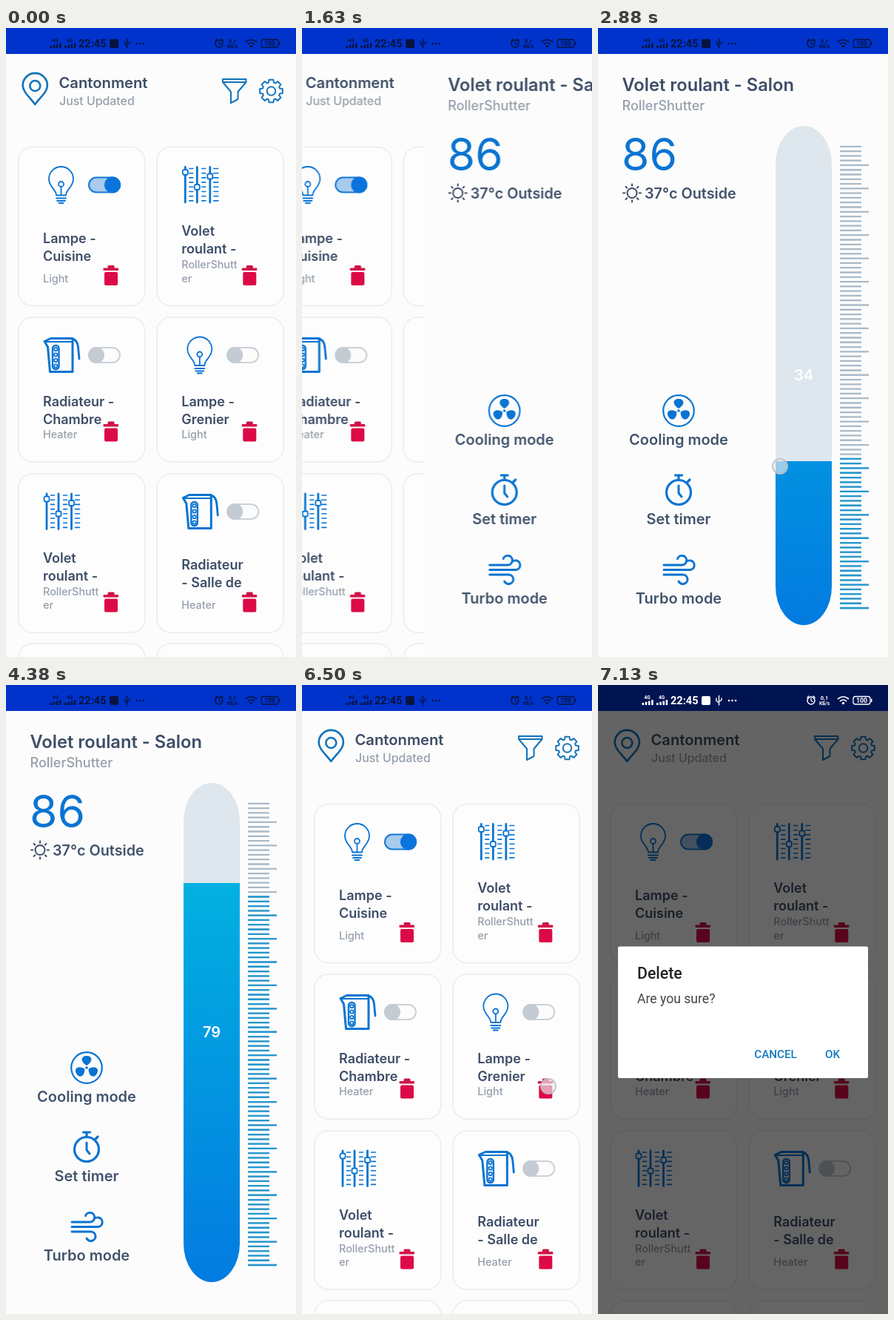
These frames come from a looping animation (392x848 px, 8000 ms). An HTML page:

```html
<!DOCTYPE html>
<html lang="en">
<head>
<meta charset="utf-8">
<title>Home control</title>
<style>
html, body { margin: 0; width: 100%; height: 100%; overflow: hidden; background: #fcfcfc; }
#stage { position: relative; width: 392px; height: 848px; overflow: hidden; font-family: Inter, "Open Sans", sans-serif; }
#stage > *, .page > * { position: absolute; }
.page, svg, #dim { left: 0; top: 0; width: 392px; height: 848px; }
.page { background: #fcfcfc; }
svg { display: block; }
text { white-space: pre; }
.roboto { font-family: Roboto, sans-serif; }

/* every motion advances in 125 ms steps */
#list, #detail, #touch, #dim, #dialog, #status, #live {
  animation: 8s step-end -8ms infinite;
}
#list { animation-name: under; }
#detail { animation-name: slide, level; animation-duration: 8s, 8s; transform: translateX(100%); --lvl: 240; --val: 86; }
#live { animation-name: live; clip-path: inset(calc(var(--lvl) * .93px + 33.5px) 0 0 0); }
#touch { animation-name: touch; }
#dim { animation-name: dim; background: #000; opacity: 0; }
#dialog { animation-name: dialog; opacity: 0; transform-origin: 196px 441px; }
#status { animation-name: status; color: #07143f; }

#bar { left: 0; top: 0; width: 392px; height: 34.5px; background: #0033cc; }
#tank { left: 240px; top: 132px; width: 76px; height: 673px; border-radius: 38px / 52px; overflow: hidden; background: #dde7ed; }
#fill { height: 100%; background: linear-gradient(#02b3e1 108px, #027be0 100%); clip-path: inset(calc(var(--lvl) * 1px - 132px) 0 0 0); }
#value { left: 240px; top: 456px; width: 76px; text-align: center; color: #fff; font-size: 20px; font-weight: 600; line-height: 24px; counter-reset: value var(--val); }
#value::after { content: counter(value); }
#touch { left: -11px; top: -11px; width: 18px; height: 18px; border: 2px solid rgba(190,182,186,.75); border-radius: 50%; background: rgba(235,238,240,.65); opacity: 0; }

@keyframes slide {
  0% { transform: translateX(100%); }
  18.75% { transform: translateX(84%); }
  20.3125% { transform: translateX(42%); }
  21.875% { transform: translateX(16%); }
  23.4375% { transform: translateX(4%); }
  25% { transform: none; }
  56.25% { transform: translateX(26%); }
  57.8125% { transform: translateX(80%); }
  59.375% { transform: translateX(100%); }
}
@keyframes under {
  0% { transform: none; }
  18.75% { transform: translateX(-5%); }
  20.3125% { transform: translateX(-17%); }
  21.875% { transform: translateX(-25%); }
  23.4375% { transform: translateX(-29%); }
  25% { transform: translateX(-30%); }
  56.25% { transform: translateX(-22%); }
  57.8125% { transform: translateX(-6%); }
  59.375% { transform: none; }
}
@keyframes level {
  0% { --lvl: 240; --val: 86; }
  32.8125% { --lvl: 305; --val: 76; }
  34.375% { --lvl: 445; --val: 55; }
  35.9375% { --lvl: 584; --val: 34; }
  37.5% { --lvl: 640; --val: 25; }
  39.0625% { --lvl: 662; --val: 21; }
  40.625% { --lvl: 664; --val: 20; }
  42.1875% { --lvl: 590; --val: 33; }
  43.75% { --lvl: 400; --val: 60; }
  45.3125% { --lvl: 275; --val: 78; }
  48.4375% { --lvl: 267; --val: 79; }
}
@keyframes live { 0% { opacity: 0; } 32.8125% { opacity: 1; } }
@keyframes touch {
  0% { opacity: 0; }
  15.625% { opacity: 1; transform: translate(256px, 290px); }
  18.75% { opacity: 0; }
  31.25% { opacity: 1; transform: translate(246px, 247px); }
  32.8125% { opacity: 1; transform: translate(246px, 312px); }
  34.375% { opacity: 1; transform: translate(246px, 452px); }
  35.9375% { opacity: 1; transform: translate(246px, 591px); }
  37.5% { opacity: 1; transform: translate(246px, 647px); }
  39.0625% { opacity: 1; transform: translate(246px, 669px); }
  40.625% { opacity: 1; transform: translate(246px, 671px); }
  42.1875% { opacity: 1; transform: translate(246px, 597px); }
  43.75% { opacity: 1; transform: translate(246px, 407px); }
  45.3125% { opacity: 1; transform: translate(246px, 282px); }
  48.4375% { opacity: .6; transform: translate(246px, 274px); }
  50% { opacity: 0; }
  81.25% { opacity: 1; transform: translate(333px, 541px); }
  84.375% { opacity: 0; }
}
@keyframes dim {
  0% { opacity: 0; }
  84.375% { opacity: .15; }
  85.9375% { opacity: .4; }
  87.5% { opacity: .57; }
  89.0625% { opacity: .6; }
}
@keyframes dialog {
  0% { opacity: 0; }
  85.9375% { opacity: .6; transform: scale(.97); }
  87.5% { opacity: .96; transform: none; }
  89.0625% { opacity: 1; transform: none; }
}
@keyframes status {
  0% { color: #07143f; }
  84.375% { color: #5a678f; }
  85.9375% { color: #c5cbdd; }
  87.5% { color: #fff; }
}
</style>
</head>
<body>
<div id="stage">
  <div id="list" class="page"></div>
  <div id="detail" class="page">
    <svg id="info"></svg>
    <svg id="scale"></svg>
    <svg id="live"></svg>
    <div id="tank"><div id="fill"></div></div>
    <div id="value"></div>
  </div>
  <div id="bar"></div>
  <div id="touch"></div>
  <div id="dim"></div>
  <svg id="dialog" class="roboto"></svg>
  <svg id="status" class="roboto"></svg>
</div>
<script>
const BLUE = '#0a74d2', INK = '#3d4d67', GREY = '#959fac';
const $ = id => document.getElementById(id);
const text = (x, y, s, size, weight, fill, anchor = 'start') =>
  `<text x="${x}" y="${y}" font-size="${size}" font-weight="${weight}" fill="${fill}" text-anchor="${anchor}">${s}</text>`;
const at = (x, y, body) => `<g transform="translate(${x} ${y})">${body}</g>`;
const line = (d, width = 2, color = BLUE, fill = 'none') =>
  `<path d="${d}" fill="${fill}" stroke="${color}" stroke-width="${width}" stroke-linecap="round" stroke-linejoin="round"/>`;
const dot = (x, y, r, fill, stroke = 'none', width = 0) =>
  `<circle cx="${x}" cy="${y}" r="${r}" fill="${fill}" stroke="${stroke}" stroke-width="${width}"/>`;
const box = (x, y, w, h, r, fill, stroke = 'none', width = 0) =>
  `<rect x="${x}" y="${y}" width="${w}" height="${h}" rx="${r}" fill="${fill}" stroke="${stroke}" stroke-width="${width}"/>`;
const range = (n, f) => Array.from({ length: n }, (_, i) => f(i)).join('');

const icons = {
  bulb:
    line('M17.5 39C17.5 31 7.5 28 7.5 17A16.5 16.5 0 0 1 40.5 17C40.5 28 30.5 31 30.5 39Z', 1.8) +
    line('M17.5 43H30.5M18.5 46.5H29.5M21 49.5H27M24 27V38', 1.8) + dot(24, 24, 3.5, 'none', BLUE, 1.8),
  sliders:
    line([10, 27, 43].map(x => range(8, i => `M${x} ${3 + i * 6.2}h${x > 40 ? 6 : 5}`)).join(''), 1.6) +
    line('M4.5 1V48.5M20.5 1V48.5M38 1V48.5', 2.8) +
    [[4.5, 8], [20.5, 28], [38, 13.5]].map(([x, y]) => box(x - 3.5, y - 3.5, 7, 7, 2, '#fcfcfc', BLUE, 1.8)).join(''),
  kettle:
    line('M9 47.5L6 14L1.5 6.5L10 2.5H39.5V47.5Z', 3) + line('M3 7H39', 2.2) +
    line('M32 2.5H38Q46 4 47 14L48.5 30', 2.8) + box(12.5, 12, 8.5, 32, 4, 'none', BLUE, 2.4) +
    range(4, i => dot(16.8, 17 + i * 7.5, 2.2, 'none', BLUE, 1.8))
};

const toggle = on => on
  ? box(1, 1, 42, 20, 10, '#a8caec', '#1479d6', 2) + dot(33, 11, 11, '#0a74dc')
  : box(1, 1, 42, 20, 10, '#fcfcfc', '#cbd1d8', 2) + dot(11, 11, 11, '#c4cbd3');
const trash = box(6, 0, 9, 5, 1.5, '#c91346') + box(0, 3.5, 20.5, 3.5, 1, '#d41348') + box(1.5, 9, 18, 18, 2, '#dc0a46');

// Title and caption lines hang from the card's bottom edge.
function card(x, y, h, icon, title, titleY, caption, state) {
  const small = caption.map((s, i) => text(34, h - 31.5 - 18.5 * (caption.length - 1 - i), s, 14.4, 500, GREY)).join('');
  return at(x, y, box(.75, .5, 171, h, 19, '#fdfdfd', '#ececee', 1.5) +
    at(34.5, 26.5, icons[icon]) +
    (state == null ? '' : at(95, 40.5, toggle(state))) +
    title.map((s, i) => text(34, h - titleY + i * 24, s, 18, 600, INK)).join('') + small +
    at(115.5, h - 54, trash));
}

const gear = range(8, i => [[-.3, 12], [-.19, 15.6], [.19, 15.6], [.3, 12]].map(([a, r], j) => {
  const t = i * Math.PI / 4 + a;
  return `${i + j ? 'L' : 'M'}${(r * Math.cos(t)).toFixed(2)} ${(r * Math.sin(t)).toFixed(2)}`;
}).join('')) + 'Z';

const shutter = ['RollerShutt', 'er'], roller = ['Volet', 'roulant -'];
$('list').innerHTML = '<svg>' +
  line('M39.3 103C31 92 22.7 86 22.7 77.5A16.6 16.6 0 0 1 55.9 77.5C55.9 86 47.5 92 39.3 103Z', 2.6, '#1273ba') +
  dot(39.3, 78, 7, 'none', '#1273ba', 2.6) +
  text(71.5, 81, 'Cantonment', 20.2, 600, INK) + text(72, 104, 'Just Updated', 15.9, 500, GREY) +
  line('M293 69H324.5V73L313.5 86V96L304 101V86L293 73ZM293 73H324.5', 2, '#1273ba') +
  at(358.5, 85, line(gear, 2, '#1a76bc') + dot(0, 0, 5.8, 'none', '#1a76bc', 2)) +
  card(16, 160, 214, 'bulb', ['Lampe -', 'Cuisine'], 84, ['Light'], true) +
  card(203.3, 160, 214, 'sliders', roller, 94, shutter) +
  card(16, 389.5, 195, 'kettle', ['Radiateur -', 'Chambre'], 75, ['Heater'], false) +
  card(203.3, 389.5, 195, 'bulb', ['Lampe -', 'Grenier'], 75, ['Light'], false) +
  card(16, 600.5, 214, 'sliders', roller, 94, shutter) +
  card(203.3, 600.5, 214, 'kettle', ['Radiateur', '- Salle de'], 84.5, ['Heater'], false) +
  [16, 203.3].map(x => box(x + .75, 830, 171, 195, 19, '#fdfdfd', '#ececee', 1.5)).join('') + '</svg>';

const rays = range(8, i => `<path d="M0-9.8V-12" transform="rotate(${i * 45})" stroke="${INK}" stroke-width="2" stroke-linecap="round"/>`);
const blades = range(3, i => `<path d="M0-3C-9-8-8-16 0-16S9-8 0-3Z" transform="rotate(${i * 120})" fill="${BLUE}"/>`);
const label = (y, s) => text(109, y, s, 20, 600, '#41536b', 'middle');
$('info').innerHTML =
  text(32.5, 84.5, 'Volet roulant - Salon', 23.7, 600, INK) +
  text(32.5, 110.5, 'RollerShutter', 18, 500, GREY) +
  text(32, 192, '86', 60.5, 400, BLUE) +
  at(46, 222.5, dot(0, 0, 6.5, 'none', INK, 2) + rays) +
  text(63, 229.5, '37°c Outside', 19.8, 600, '#41536b') +
  at(109, 516, dot(0, 0, 20.8, 'none', BLUE, 2.2) + blades + dot(0, 0, 3, '#fcfcfc') + dot(0, 0, 1.8, BLUE)) +
  label(562, 'Cooling mode') +
  at(109, 626, dot(0, 0, 16.5, 'none', BLUE, 3.2) + line('M0-9V1L4 6', 3) + line('M-4.5-23H4.5M0-22V-17M12-14L15-17', 3.2)) +
  label(669, 'Set timer') +
  line('M89 724H113.5A6.3 6.3 0 1 0 107.5 715.5M89 730.5H124A6.3 6.3 0 1 0 118 722M89 737H114.5A6.3 6.3 0 1 1 109 746', 3) +
  label(776, 'Turbo mode');

const ticks = range(100, i => `M327 ${(159.8 + i * 6.285).toFixed(2)}H${i % 5 === 4 ? 366 : 356}`);
const ruler = color => `<path d="${ticks}" stroke="${color}" stroke-width="2.3"/>`;
$('scale').innerHTML = ruler('#a9bac8');
$('live').innerHTML = ruler('#2398cf');

$('dialog').innerHTML =
  box(27, 352.5, 338, 177.5, 2, '#fff') +
  text(53, 395.5, 'Delete', 21.3, 500, '#222') +
  text(53, 429, 'Are you sure?', 17.6, 400, '#444') +
  text(240, 502.5, 'CANCEL', 15.2, 500, '#1179bd', 'middle') +
  text(317, 502.5, 'OK', 15.2, 500, '#1179bd', 'middle');

const C = 'currentColor';
const signal = x => text(x + 3, 19, '4G', 6.5, 700, C) +
  range(4, i => box(x + i * 4.2, 24 - i * 1.3, 2.6, 3 + i * 1.3, .5, C));
$('status').innerHTML = signal(59.5) + signal(79) +
  text(98, 26, '22:45', 14.6, 700, C) +
  box(140, 15, 12, 12, 2, C) +
  line('M163.5 14.5V27M160 18V21.5L163.5 24M167 18V20.5L163.5 22.5', 1.4, C) +
  range(3, i => dot(177 + i * 4.5, 21, 1.3, C)) +
  dot(288, 21, 5, 'none', C, 1.5) + line('M288 18V21L290 22.5M282.8 17L285 15M293.2 17L291 15', 1.3, C) +
  text(306, 19.5, '0,1', 7.5, 700, C, 'middle') + text(306, 27, 'КБ/s', 6.5, 700, C, 'middle') +
  line('M324.5 18.5Q331.5 13 338.5 18.5M327.5 21.5Q331.5 18.5 335.5 21.5', 1.7, C) + dot(331.5, 24.5, 1.7, C) +
  box(345, 15.5, 23, 10.5, 3, 'none', C, 1.3) + box(369, 18.5, 1.5, 4.5, .5, C) +
  text(356.5, 24, '100', 8.8, 700, C, 'middle');
</script>
</body>
</html>
```
